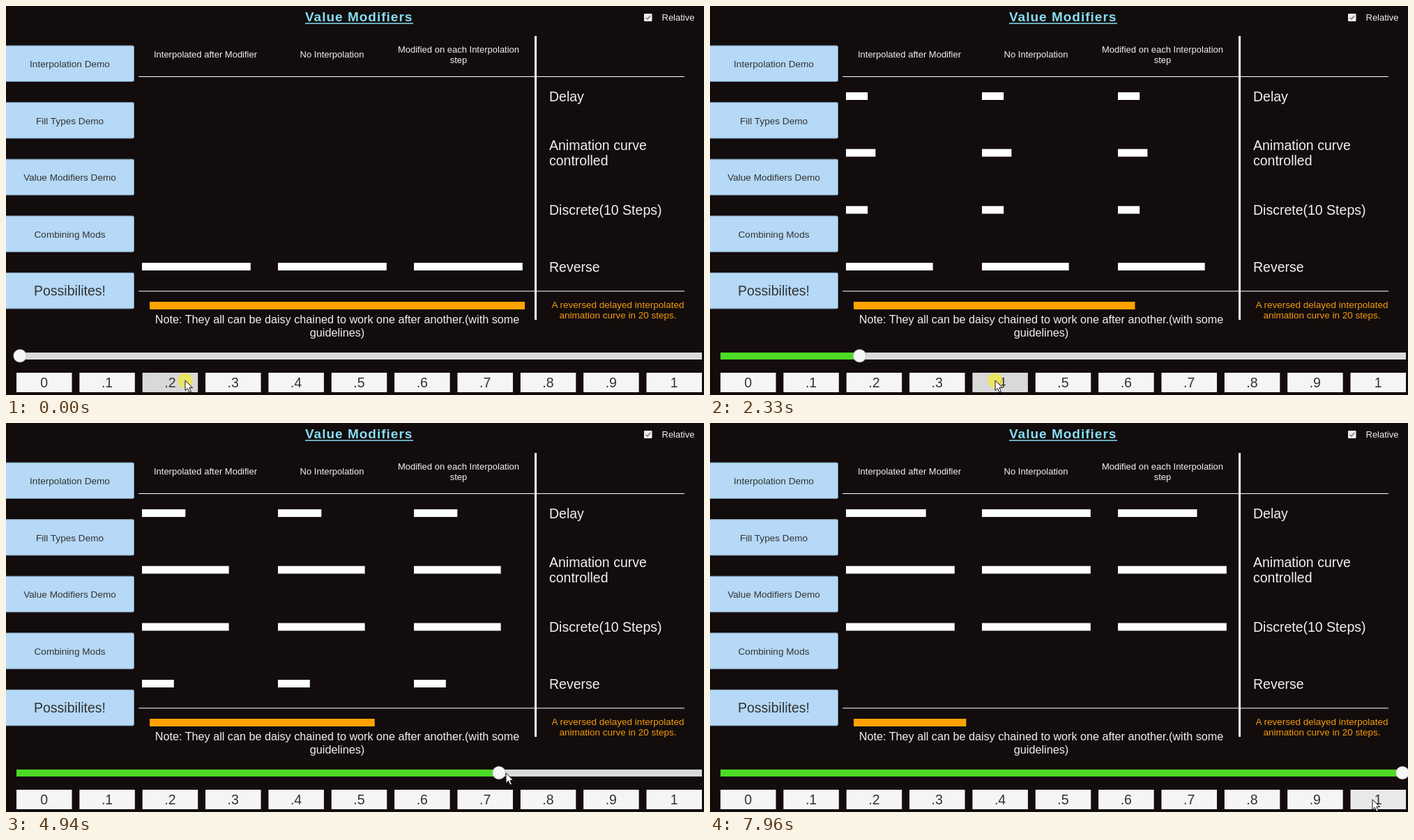
These frames come from a looping animation (1001x559 px, 8 s). An HTML page:

```html
<!DOCTYPE html>
<html lang="en">
<head>
<meta charset="utf-8">
<title>Value Modifiers</title>
<style>
  html, body { margin: 0; width: 100%; height: 100%; overflow: hidden; background: #120c0d; }
  svg { display: block; width: 1001px; height: 559px; font-family: "Liberation Sans", Arial, sans-serif; }
</style>
</head>
<body>
<svg id="stage" viewBox="0 0 1001 559"></svg>
<script>
const LOOP = 8000, GLIDE = 450;
const stage = document.getElementById("stage");

function add(tag, attrs, text) {
  const el = document.createElementNS("http://www.w3.org/2000/svg", tag);
  for (const key in attrs) el.setAttribute(key, attrs[key]);
  if (text) el.textContent = text;
  stage.append(el);
  return el;
}
const rect = (x, y, width, height, fill, more) => add("rect", { x, y, width, height, fill, ...more });
const label = (text, x, y, size, fill = "#f0f0f0", anchor = "middle", more) =>
  add("text", { x, y, "font-size": size, fill, "text-anchor": anchor, ...more }, text);

// Heading and checkbox
label("Value Modifiers", 429, 22, 19, "#86def2", "start", { "font-weight": "bold", "letter-spacing": 1 });
rect(429, 24.3, 155, 1.5, "#86def2");
rect(915, 11, 11.5, 11, "#efefef", { rx: 1 });
add("path", { d: "M917.5 16.5l2.5 2.5 4-5", fill: "none", stroke: "#777", "stroke-width": 1.5 });
label("Relative", 940.5, 21, 13, "#f0f0f0", "start");

// Side menu
["Interpolation Demo", "Fill Types Demo", "Value Modifiers Demo", "Combining Mods", "Possibilites!"].forEach((text, i) => {
  const y = 57 + i * 81.6;
  rect(-4, y, 187.5, 51.5, "#b5d9f6", { rx: 2, stroke: "#7f98ac", "stroke-width": 1 });
  label(text, 91.5, y + (i === 4 ? 33 : 31), i === 4 ? 19.5 : 13.6, "#333");
});

// Table
label("Interpolated after Modifier", 286, 74, 13);
label("No Interpolation", 467.5, 74, 13);
label("Modified on each Interpolation", 649, 66.5, 13);
label("step", 649, 81.5, 13);
rect(190, 101, 783, 1, "#fff");
rect(190, 409.3, 783, 1, "#fff");
rect(758, 43, 3, 408, "#fff");
[["Delay", 136.5], ["Animation curve", 207], ["controlled", 229], ["Discrete(10 Steps)", 300], ["Reverse", 381.5]]
  .forEach(([text, y]) => label(text, 779, y, 19.5, "#f0f0f0", "start"));
label("A reversed delayed interpolated", 877.5, 434, 13.5, "#f39c0b");
label("animation curve in 20 steps.", 877.5, 449, 13.5, "#f39c0b");
label("Note: They all can be daisy chained to work one after another.(with some", 475, 456, 16.2);
label("guidelines)", 475, 475, 16.2);

const bars = [124, 205.5, 287.5, 369].map(y => [195, 390, 585].map(x => rect(x, y, 0, 11, "#fff")));
const chainBar = rect(206, 425, 538, 11, "#ffa200");

// Slider and its buttons
rect(15, 498, 983, 10, "#dadada");
const fill = rect(15, 498, 0, 10, "#4dda25");
const knob = add("circle", { cy: 502.7, r: 9.3, fill: "#f6f6f6", stroke: "#aaa", "stroke-width": 0.7 });
const buttons = Array.from({ length: 11 }, (_, i) => {
  const x = 15 + i * 90.35;
  const box = rect(x, 527, 79.5, 28, "#f5f5f5");
  label(i % 10 ? "." + i : String(i / 10), x + 39.7, 547.5, 19.5, "#333");
  return box;
});

const halo = add("circle", { r: 10.8, fill: "#eee84a", "fill-opacity": 0.82 });
const cursor = add("path", {
  d: "M0 0V14.5L3.4 11.4 6 17.2 8.4 16.1 5.9 10.5H10.5Z",
  fill: "#fff", stroke: "#111", "stroke-width": 1
});

// Each move: start, values, when the delayed row follows, steps of the chained bar
const moves = [
  { at: 265, from: 0, to: 0.2, echo: 880, base: 0, ticks: [1400, 1480, 1580, 1695, 1845] },
  { at: 2430, from: 0.2, to: 0.4, echo: 3017, base: 4, ticks: [3550, 3705, 3865, 4030] },
  { at: 4150, from: 0.4, to: 0.706, echo: 5730, base: 8, drag: 790, ticks: [6250, 6330, 6420, 6560, 6635, 6715, 6865] },
  { at: 7250, from: 0.706, to: 1, echo: 7915, base: 14, ticks: [] }
];
const presses = [[0, 265], [2330, 2430], [4050, 4860], [7100, 7250]];
const shades = [
  [0, 265, 2, "#d9d9d9"], [265, 2120, 2, "#e9e9e9"],
  [2280, 2330, 4, "#e9e9e9"], [2330, 2430, 4, "#d9d9d9"], [2430, 4130, 4, "#e9e9e9"],
  [6400, 7100, 10, "#e9e9e9"], [7100, 7250, 10, "#d9d9d9"], [7250, LOOP, 10, "#e9e9e9"]
];
const cursorPath = [
  [0, 257, 538], [2000, 257, 538], [2320, 409, 538], [3800, 409, 538], [4040, 417.5, 505],
  [4150, 417.5, 505], [4940, 717, 503], [5760, 717, 503], [6180, 889, 529], [6500, 950, 541], [LOOP, 950, 541]
];
const curvePoints = [[0, 0], [0.2, 0.272], [0.4, 0.494], [0.706, 0.8], [1, 1]];

const clamp = v => Math.min(1, Math.max(0, v));
const lerp = (a, b, p) => a + (b - a) * p;
const easeOut = p => 1 - (1 - p) ** 2;

function along(points, at, column = 1) {
  const i = Math.max(1, points.findIndex(point => point[0] >= at));
  const a = points[i - 1], b = points[i];
  return lerp(a[column], b[column], (at - a[0]) / (b[0] - a[0]));
}

const modifiers = [
  v => v,
  v => along(curvePoints, v),
  v => Math.ceil(v * 10 - 1e-6) / 10,
  v => 1 - v
];

function draw(t) {
  const move = moves.findLast(m => m.at <= t) || { ...moves[0], to: 0 };
  const { from, to, drag } = move;
  const dragPart = drag && easeOut(clamp((t - move.at) / drag));

  modifiers.forEach((modify, row) => {
    const start = row ? move.at : move.echo;
    const dragging = row && drag;
    const part = lag => dragging ? dragPart : clamp((t - start - lag) / GLIDE);
    const direct = dragging ? lerp(from, to, dragPart) : t >= start ? to : from;
    const values = [
      lerp(modify(from), modify(to), part(0)),
      modify(direct),
      modify(lerp(from, to, part(12)))
    ];
    values.forEach((v, col) => bars[row][col].setAttribute("width", 155.8 * clamp(v)));
  });

  const steps = move.base + move.ticks.filter(tick => tick <= t).length;
  chainBar.setAttribute("width", 538 * (1 - steps / 20));

  const knobX = 20 + 973 * (drag ? lerp(from, to, dragPart) : to);
  knob.setAttribute("cx", knobX);
  fill.setAttribute("width", to ? knobX - 15 : 0);

  buttons.forEach((button, i) => {
    const shade = shades.find(([a, b, index]) => index === i && t >= a && t < b);
    button.setAttribute("fill", shade ? shade[3] : "#f5f5f5");
  });

  const dragging = drag && t < move.at + drag;
  const x = dragging ? knobX + 9 : along(cursorPath, t), y = along(cursorPath, t, 2);
  cursor.setAttribute("transform", `translate(${x} ${y})`);
  halo.setAttribute("cx", x);
  halo.setAttribute("cy", y + 0.5);
  halo.setAttribute("visibility", presses.some(([a, b]) => t >= a && t < b) ? "visible" : "hidden");
}

function tick() {
  draw(performance.now() % LOOP);
  requestAnimationFrame(tick);
}
tick();
</script>
</body>
</html>
```
